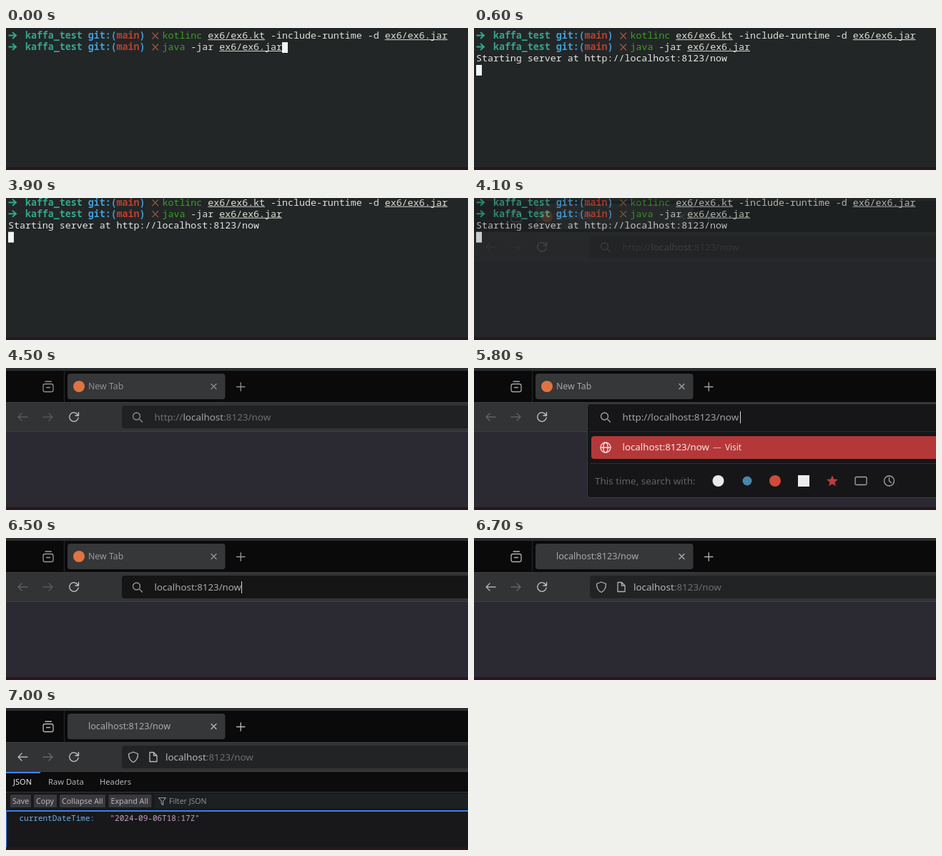
Recreate the animation shown at these times as an HTML page. Size 646 by 200 pixels, loop 8000 ms.

```html
<!DOCTYPE html>
<html lang="en">
<head>
<meta charset="utf-8">
<title>Terminal to browser</title>
<style>
  html, body { margin: 0; width: 100%; height: 100%; overflow: hidden; background: #232627; }
  svg { display: block; width: 646px; height: 200px; }
  text { white-space: pre; font-family: "Noto Sans", "Open Sans", sans-serif; }
  .mono { font-family: "Noto Sans Mono", "DejaVu Sans Mono", monospace; }
  .line { fill: none; stroke: var(--ink); stroke-width: 1.3; stroke-linecap: round; stroke-linejoin: round; }
  .ink { fill: var(--ink); }
  #browser { --ink: #8e8f91; }
</style>
</head>
<body>
<svg id="stage" viewBox="0 0 646 200"></svg>
<script>
const LOOP = 8000, CELL = 7.98, LEFT = 3;

const rect = (x, y, w, h, fill, more = '') =>
  `<rect x="${x}" y="${y}" width="${w}" height="${h}" fill="${fill}" ${more}/>`;
const dot = (x, y, r, fill) => `<circle cx="${x}" cy="${y}" r="${r}" fill="${fill}"/>`;
const text = (x, y, size, fill, s, more = '') =>
  `<text x="${x}" y="${y}" font-size="${size}" fill="${fill}" ${more}>${s}</text>`;
const line = (d, more = '') => `<path class="line" d="${d}" ${more}/>`;
const group = (id, ...parts) => `<g id="${id}">${parts.join('')}</g>`;
const span = (fill, s) => `<tspan fill="${fill}">${s}</tspan>`;

// Terminal: text sits on a grid, rows are 16 high
const cell = (col, row, fill, s, more = '') =>
  text(LEFT + col * CELL, 15 + row * 16, 13.3, fill, s, 'class="mono" ' + more);
const path = (col, row, s) => cell(col, row, '#e0dfd4', s) +
  rect(LEFT + col * CELL, 16 + row * 16, s.length * CELL, 1, '#d6d6cc');
const cursor = (id, col, row) =>
  group(id, rect(Math.round(LEFT + col * CELL), 4 + row * 16, 8, 15, '#f2f3f3'));

function prompt(row) {
  const y = 10.5 + row * 16, bold = 'font-weight="700"';
  return `<path d="M3.500 ${y}h10.500m-5 -4.500l5 4.500l-5 4.500" fill="none" stroke="#35a88a" stroke-width="1.900"/>` +
    cell(3, row, '#36a58c', 'kaffa_test', bold) +
    cell(14, row, '#3f9fd8', 'git:(', bold) +
    cell(19, row, '#b8402f', 'main', bold) +
    cell(23, row, '#3f9fd8', ')', bold) +
    `<path d="M204.500 ${y - 4}l8.500 9m0 -9l-8.500 9" fill="none" stroke="#9c6146" stroke-width="1.1"/>`;
}

const terminal = group('terminal',
  prompt(0), cell(27, 0, '#39a024', 'kotlinc'), path(35, 0, 'ex6/ex6.kt'),
  cell(46, 0, '#e0dfd4', '-include-runtime -d'), path(66, 0, 'ex6/ex6.jar'),
  prompt(1), cell(27, 1, '#39a024', 'java'), cell(32, 1, '#e0dfd4', '-jar'),
  path(37, 1, 'ex6/ex6.jar'),
  group('output', cell(0, 2, '#e6e6e0', 'Starting server at http://localhost:8123/now')),
  cursor('curRun', 48, 1), cursor('curWait', 0, 2), cursor('curServe', 0, 3));

// Browser frame
const chrome = [
  rect(0, 0, 646, 4, '#2a2e2f'),
  rect(0, 4, 646, 44, '#0a0a0b'),
  rect(0, 48, 646, 42, '#323334'),
  rect(0, 48, 646, 1, '#3d3e40'),
  rect(0, 89, 646, 1, '#3d3e40'),
  rect(0, 90, 646, 106, '#2b2a33'),
  rect(81, 4, 1, 44, '#262728'),
  rect(86, 8, 220.5, 36, '#363739', 'rx="4"'),
  line('M55 19h8.500M54.500 22.500h9a2.500 2.500 0 0 1 2.500 2.500v6a2.500 2.500 0 0 1 -2.500 2.500h-9a2.500 2.500 0 0 1 -2.500 -2.500v-6a2.500 2.500 0 0 1 2.500 -2.500zM56.500 27.500h5'),
  line('M287 22.500l7 7m0 -7l-7 7M322.500 26.500h11.500m-5.750 -5.750v11.500'),
  group('backOff', line('M30 69h-13m5 -5l-5 5l5 5', 'opacity=".45"')),
  group('backOn', line('M30 69h-13m5 -5l-5 5l5 5')),
  line('M52 69h13m-5 -5l5 5l-5 5', 'opacity=".4"'),
  line('M100.500 66a6.300 6.300 0 1 0 .7 4M101.500 62.500v4.500h-4.500', 'style="stroke:#c6c7c8"'),
].join('');

const magnifier = line('M187 72.500l3.500 3.500') +
  '<circle class="line" cx="182.500" cy="68" r="5"/>';
const caret = x => rect(x, 61, 1, 17, '#d5d5d6');
const url = (x, scheme, host) =>
  text(x, 74, 13.45, '#6d6e71', scheme + span(host, 'localhost') + ':8123/now');

const tabs = group('newTab', dot(102, 26, 8, '#df7440'),
    text(115, 30, 12.3, '', 'New Tab', 'class="ink"')) +
  group('pageTab', text(115, 30, 12.6, '#a9aaac', 'localhost:8123/now'));

const fields = group('idle', rect(162, 53, 500, 32, '#202122', 'rx="4"'),
    magnifier, url(207.5, 'http://', '#a2a3a5')) +
  group('entered', rect(162, 53, 500, 32, '#151516', 'rx="4"'),
    magnifier, text(207.5, 74, 13.3, '#a9aaab', 'localhost:8123/now'), caret(329)) +
  group('visited', rect(162, 53, 500, 32, '#222324', 'rx="4"'),
    line('M178 62l6.500 2.500c0 6 -1.500 9.500 -6.500 12c-5 -2.500 -6.500 -6 -6.500 -12z'),
    line('M201 62.500h5.500l4.500 4.500v8.500h-10zM206.500 62.500v4.500h4.500'),
    url(223, '', '#b4b5b7'));

// Address suggestions
const star = Array.from({ length: 10 }, (_, i) => {
  const a = i * Math.PI / 5 - Math.PI / 2, r = i % 2 ? 3.8 : 8.3;
  return `${501 + r * Math.cos(a)},${159.5 + r * Math.sin(a)}`;
}).join(' ');
const white = 'style="stroke:#f3dede"';
const popup = group('popup',
  rect(158.5, 50.5, 500, 132, '#161618', 'rx="4" stroke="#3a3b3d"'),
  magnifier, text(207.5, 74, 13.45, '#a2a3a5', 'http://localhost:8123/now'), caret(372),
  rect(162, 89, 484, 1, '#2b2c2e'),
  rect(164, 96, 500, 32, '#b53839', 'rx="4"'),
  `<circle class="line" cx="184" cy="112" r="7" ${white}/>`,
  `<ellipse class="line" cx="184" cy="112" rx="3.200" ry="7" ${white}/>`,
  line('M177 112h14', white),
  text(207.5, 116, 13.3, '#f5e6e6', 'localhost:8123/now'),
  text(334, 116, 11.8, '#e3b1b1', '—'),
  text(351, 116, 11.8, '#f3dede', 'Visit'),
  rect(162, 134, 484, 1, '#2b2c2e'),
  text(169, 164, 13.45, '#626366', 'This time, search with:'),
  dot(341.5, 159, 8, '#e9e9ea'), dot(382, 159, 6.5, '#4a86ab'),
  dot(421, 159, 8, '#cf4a38'), rect(453, 151, 16, 16, '#ececec'),
  `<polygon points="${star}" fill="#bd3d3d"/>`,
  line('M534.500 153.500h13a1.500 1.500 0 0 1 1.500 1.500v8a1.500 1.500 0 0 1 -1.500 1.500h-13a1.500 1.500 0 0 1 -1.500 -1.500v-8a1.500 1.500 0 0 1 1.500 -1.500z'),
  '<circle class="line" cx="580.500" cy="159" r="7"/>', line('M580.500 154.500v4.500l3 2.500'));

// JSON page
const button = (x, w, s) => rect(x, 122, w, 18, '#38383d', 'rx="1"') +
  text(x + 3, 135, 10.7, '#b6b6ba', s);
const page = group('blank', rect(0, 90, 646, 106, '#18181a')) +
  group('json',
    rect(0, 90, 646, 28, '#0c0c0d'),
    rect(0, 90, 48, 2, '#3f83ee'),
    text(10, 108, 11, '#e6e6e8', 'JSON'),
    text(59, 108, 11.2, '#b4b4b8', 'Raw Data'),
    text(131, 108, 11.2, '#b4b4b8', 'Headers'),
    rect(0, 118, 646, 27, '#18191b'),
    rect(0, 118, 646, 1, '#343538'),
    button(6, 29, 'Save'), button(39, 32, 'Copy'),
    button(75, 64, 'Collapse All'), button(143.5, 60, 'Expand All'),
    rect(208, 121, 438, 20, '#1b2023'),
    line('M213.500 126.500h10l-3.800 4.500v5.500l-2.400 -1.800v-3.700z', 'style="stroke:#9a9b9f;stroke-width:1.100"'),
    text(228, 135, 10.5, '#8b8c90', 'Filter JSON'),
    rect(0, 144, 646, 52, '#18181a')) +
  group('data',
    rect(0, 144, 646, 2, '#3f7dea'), rect(0, 144, 1, 52, '#3f7dea'),
    text(18.5, 159, 11, '#6fb2ee', 'currentDateTime:', 'class="mono"'),
    text(145.5, 159, 11, '#c4a2c6', '"2024-09-06T18:17Z"', 'class="mono"'));

document.getElementById('stage').innerHTML =
  rect(0, 0, 646, 200, '#232627') + terminal +
  group('browser', chrome, tabs, fields, page, popup) +
  rect(0, 196, 646, 4, '#29171f');

// start, visible parts, browser opacity, icon colour
const serve = 'output curServe', tab = 'newTab backOff idle ';
const steps = [
  [0, 'curRun', 0],
  [500, 'curWait', 0],
  [600, serve, 0],
  [4100, tab + serve, .2],
  [4200, tab + serve, .4],
  [4300, tab + serve, .6],
  [4400, tab + serve, .8],
  [4500, tab, 1, '#8e8f91'],
  [5700, 'newTab backOff popup', 1, '#98999b'],
  [5800, 'newTab backOff popup', 1, '#a4a5a7'],
  [6500, 'newTab backOff entered', 1, '#98999b'],
  [6600, 'pageTab backOff entered', 1, '#a4a5a7'],
  [6700, 'pageTab backOn visited', 1, '#b0b1b3'],
  [6800, 'pageTab backOn visited blank', 1, '#b8b9bb'],
  [6900, 'pageTab backOn visited json', 1, '#b8b9bb'],
  [7000, 'pageTab backOn visited json data', 1, '#b8b9bb'],
];
const parts = [...new Set(steps.flatMap(s => s[1].trim().split(' ')))];
const el = id => document.getElementById(id);

function draw(t) {
  const [, shown, opacity, ink = '#8e8f91'] = steps.findLast(s => s[0] <= t);
  const on = shown.split(' ');
  for (const id of parts) el(id).style.display = on.includes(id) ? '' : 'none';
  el('browser').style.opacity = opacity;
  el('browser').style.setProperty('--ink', ink);
  el('terminal').setAttribute('transform', `translate(0 ${t < 3900 ? 0 : -4.3})`);
}

const start = performance.now();
function tick() {
  draw((performance.now() - start) % LOOP);
  requestAnimationFrame(tick);
}
tick();
</script>
</body>
</html>
```
